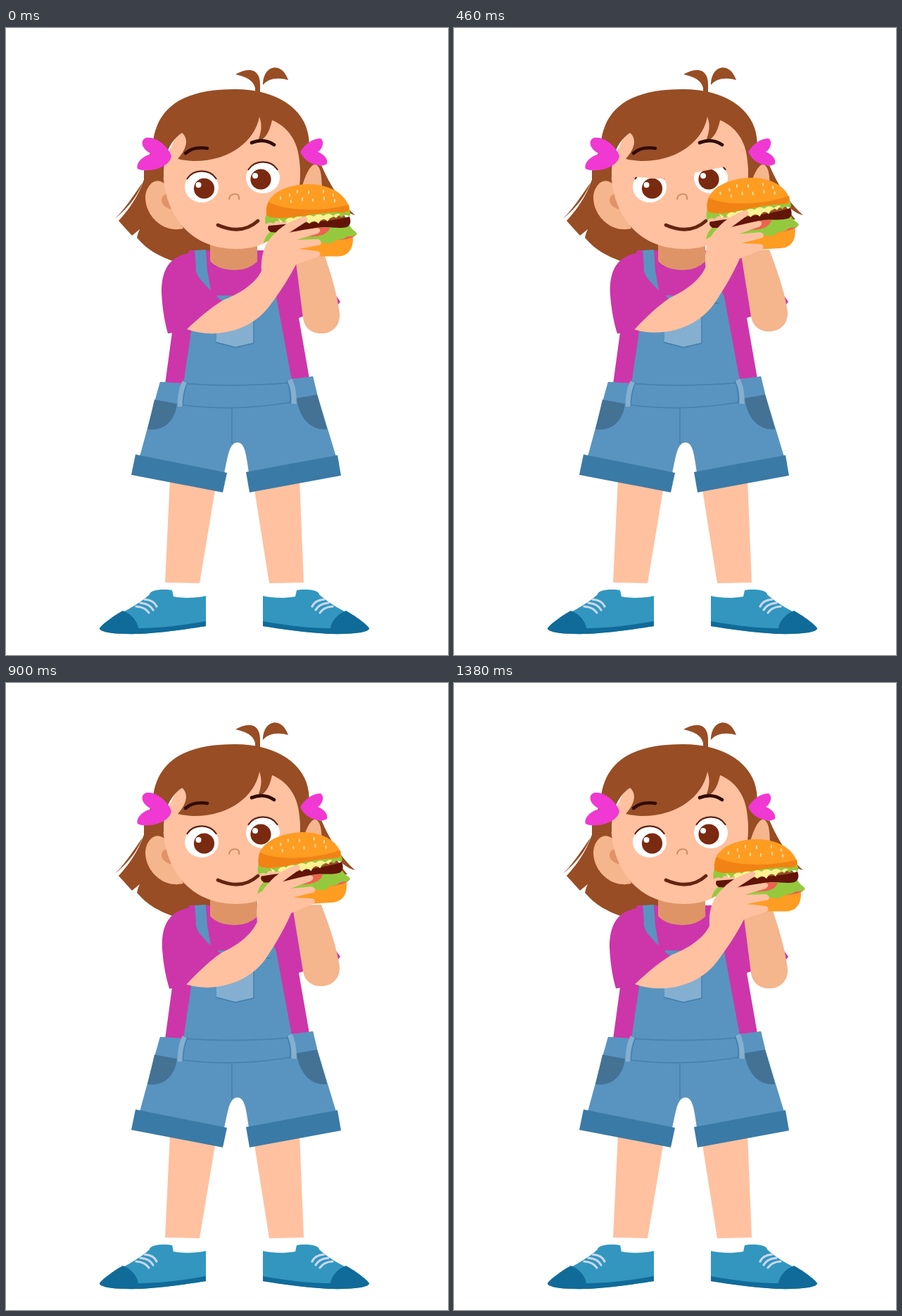
Animation, 628 px wide and 891 px high, one loop 1.4 s. Source, as an HTML page:

```html
<!DOCTYPE html>
<html lang="en">
<head>
<meta charset="utf-8">
<title>Girl with a burger</title>
<style>
html, body { margin: 0; width: 100%; height: 100%; overflow: hidden; background: #fff; }
svg { display: block; width: 100vw; height: 100vh; }
.hair { fill: #984d24; }
.skin { fill: #ffc1a0; }
.dim { fill: #f5b58d; }
.shade { fill: #df9468; }
.shirt { fill: #cc36aa; }
.denim { fill: #5994c0; }
.cuff { fill: #3a7aa6; }
.pocket { fill: #437295; }
.light { fill: #85afd0; }
.bow { fill: #f038d2; }
.bun { fill: #ff9c22; }
.leaf { fill: #95c93d; }
.tomato { fill: #ee6250; }
.line { fill: none; stroke-linecap: round; }
.seam { stroke: #437fa9; stroke-width: 1.5; }
.loop { stroke: #85afd0; stroke-width: 7; stroke-linecap: butt; }
.brow { stroke: #320b0b; stroke-width: 4.6; }
</style>
</head>
<body>
<svg viewBox="0 0 628 891">
  <defs>
    <g id="shoe">
      <path fill="#3296bf" d="M284 807V850C258 854 225 859 190 861C150 862 133 858 133 853C140 840 182 826 204 805C204 797 230 797 236 799L238 808C255 811 270 810 284 807Z"/>
      <path fill="#106b99" d="M284 850V843C250 849 220 853 188 853C187 844 179 833 166 828C150 837 140 845 133 853C133 858 150 862 190 861C225 859 258 854 284 850Z"/>
      <path class="line" stroke="#c9d8ee" stroke-width="3.2" d="M197 812Q210 813 214 822M191 817Q204 818 209 827M185 822Q198 823 203 831"/>
    </g>
    <g id="eye">
      <ellipse rx="24" ry="22" fill="#fff"/>
      <path class="line" stroke="#5a2413" stroke-width="2.2" d="M-20.500-12A24 22 0 0 1 20.500-12"/>
    </g>
    <g id="iris">
      <circle r="14.6" fill="#7a2a10"/>
      <circle r="4" cx="-8" cy="-5" fill="#fff"/>
    </g>
  </defs>

  <!-- back hair -->
  <path class="hair" d="M203 185C198 225 180 252 160 274L179 295L190 286Q187 292 186 298C200 315 220 326 240 332L295 318V190Z"/>
  <path class="hair" d="M194 220C187 239 172 257 155 271C168 258 180 240 191 224Z"/>
  <path class="hair" d="M196 200L212 160H230V225H196Z"/>
  <path class="hair" d="M420 145L443 185C453 218 466 250 485 272L415 280Z"/>
  <path class="hair" d="M446 190C457 217 474 247 496 266C478 262 460 240 449 216Z"/>
  <path class="hair" d="M326 66C342 56 361 56 361 80V92H354V85C351 74 341 69 326 66Z"/>
  <path class="hair" d="M365 81C365 52 392 47 401 74C387 70 373 71 365 81Z"/>

  <!-- legs and shoes -->
  <path class="skin" d="M233 640L299 645L275 789L226 788ZM352 650L417 640L423 788L374 789Z"/>
  <use href="#shoe"/>
  <use href="#shoe" transform="matrix(-1 0 0 1 649 0)"/>

  <!-- torso -->
  <path class="shirt" d="M237 425L226 506L431 498L416 412L472 393L475 389L432 328L400 325L370 316H260Z"/>
  <path class="shade" d="M290 300H357V332Q343 345 323 344Q300 343 290 331Z"/>
  <path class="denim" d="M300 380L362 381L380 372L384 382L407 506H252L264 425Z"/>
  <path class="line seam" d="M362 391H376"/>
  <path class="light" d="M299 420L352 408V447L326 453L299 446Z"/>
  <path class="line seam" d="M299 447L326 454L352 448V408"/>

  <!-- shorts -->
  <path class="denim" d="M219 503Q325 512 436 495L442 520L469 609L346 638C341 605 340 590 329 589C317 590 316 605 309 638L190 609L212 528Z"/>
  <path class="pocket" d="M211 528L243 534C240 560 222 574 201 570ZM413 526L442 521L456 570C435 573 416 555 413 526Z"/>
  <path class="denim" d="M219 503L212 528L248 534L250 505ZM436 495L442 520L412 526L407 502Z"/>
  <path class="line seam" d="M252 505Q325 511 404 504M252 536Q325 545 404 532M321 540V590"/>
  <path class="line seam" d="M258 504Q252 515 251 538M399 502Q405 515 404 533"/>
  <path class="line loop" d="M254 503Q247 515 247 538M403 500Q410 513 409 534"/>
  <path class="cuff" d="M184 606L314 632L308 660L178 635ZM341 631L471 607L476 636L346 660Z"/>

  <!-- head -->
  <path class="dim" d="M226 222C212 209 198 225 198 241C198 266 222 292 252 285Z"/>
  <path class="shade" d="M231 235C217 236 215 257 243 259Z"/>
  <path class="dim" d="M421 224C427 205 434 192 441 194C449 200 448 215 449 225Z"/>
  <path class="skin" d="M223 195C222 260 257 314 327 314C387 314 418 270 418 200C418 150 400 118 360 112L250 135Z"/>
  <use href="#eye" x="278" y="226"/>
  <use href="#iris" x="281.5" y="228"/>
  <use href="#eye" x="365" y="213"/>
  <use href="#iris" x="362" y="215"/>
  <rect id="lidL" class="skin" x="-27" y="-55" width="54" height="55"/>
  <rect id="lidR" class="skin" x="-27" y="-55" width="54" height="55"/>
  <path class="hair" d="M208 172C211 108 258 87 325 87C385 87 425 115 430 155C433 180 430 198 421 223H418C419 210 418 200 417 190C415 160 400 140 378 131C374 150 368 157 357 163C362 150 365 140 360 126C354 160 318 190 265 189Q252 188 244 186C257 172 260 157 250 149C233 160 223 182 224 212L213 216Z"/>
  <path class="line brow" d="M255 178Q266 168 286 171M349 163Q366 156 381 166"/>
  <path class="line" stroke="#d58f67" stroke-width="2.2" d="M317 243Q318 236 325 236T331 243"/>
  <path class="line" stroke="#64240f" stroke-width="4.8" d="M301 280Q335 295 358 274"/>
  <path class="bow" d="M235 182C231 169 214 154 199 156C190 159 192 172 207 179C195 181 184 192 187 200C197 206 232 201 235 182Z"/>
  <path class="bow" d="M418 176C424 166 436 156 447 157C453 161 450 172 443 176C451 179 458 186 456 193C449 199 425 194 418 176Z"/>

  <path id="farArm" class="dim" d="M410 318L422 412C424 428 437 435 450 434C465 433 475 422 474 406C471 380 462 350 451 318Z"/>
  <path id="sleeve" class="shirt" d="M268 319C235 321 221 340 221 375C222 400 226 420 230 434L238 433L265 428L310 390C295 380 286 365 282 345Z"/>
  <path class="denim" d="M268 316L284 315L286 345L291 373C278 360 268 350 270 340Z"/>

  <!-- burger and near arm -->
  <g id="nearArm">
    <path class="bun" d="M380 298L493 296C494 314 486 325 470 324.500H405Z"/>
    <path class="tomato" d="M400 290L470 282L497 295Q488 301 470 301Z"/>
    <path class="leaf" d="M366 306C369 291 379 286 390 285L488 280C493 289 497 288 499 293C491 299 487 293 481 299C475 302 470 299 465 304C458 309 452 303 446 306L390 306Q374 299 366 306Z"/>
    <path class="tomato" d="M400 291Q432 281 460 284Q457 294 440 296L405 298Z"/>
    <path fill="#621408" d="M373 281C400 278 460 276 488 268C491 275 489 281 484 283C470 286 460 281 440 284C420 288 400 292 376 290Q370 286 373 281Z"/>
    <path class="leaf" d="M370 264L486 256Q491 262 488 268Q482 263 477 269Q470 264 463 270L390 276Q385 271 380 278Q375 274 369 279Q367 272 370 264Z"/>
    <path fill="#fff293" d="M385 268L480 261Q473 265 469 270Q463 264 457 275Q450 267 444 278Q438 271 431 278Q423 270 416 280Q408 271 402 279Q396 270 390 277Z"/>
    <path class="leaf" d="M380 266L484 257L477 266Q471 261 465 267Q458 261 451 267Q444 262 437 268Q430 263 423 270Q416 264 409 271Q402 266 395 276Z"/>
    <path class="bun" d="M370 265C366 235 400 222 430 222C465 222 486 240 488 258C488 263 480 262 470 262C440 262 410 271 385 270Q371 269 370 265Z"/>
    <path fill="#f08314" d="M370 265Q370 254 373 247C395 260 450 262 487 251C489 260 486 263 470 262C440 262 410 271 385 270Q371 269 370 265Z"/>
    <path class="line" stroke="#ffdc98" stroke-width="2" d="M390 240v3M403 236v3M405 245v3M414 231v3M421 242v3M430 232v3M436 243v3M451 231v3M452 241v3M465 236v3M467 244v3"/>
    <path class="skin" d="M257 428C278 408 296 394 310 386C338 375 356 360 363 345C362 325 366 306 382 292C395 278 410 272 424 268C430 269 429 274 424 277L402 291Q424 286 443 284C449 286 446 292 440 293L413 301L443 300C450 302 449 309 443 309L416 314L443 317C449 319 447 325 441 326L412 336C404 352 390 375 372 398C345 432 295 442 257 428Z"/>
  </g>
</svg>
<script>
const LOOP = 1400, SHUT = 220, OPEN = 540;
const place = (id, value) => document.getElementById(id).setAttribute('transform', value);

function draw(now) {
  const t = now % LOOP;
  const lift = (1 - Math.cos(2 * Math.PI * t / LOOP)) / 2;
  const lid = t < SHUT ? t / SHUT : Math.max(0, (OPEN - t) / (OPEN - SHUT));

  place('nearArm', `rotate(${-4.4 * lift} 265 440)`);
  place('sleeve', `rotate(${-1.6 * lift} 248 340)`);
  place('farArm', `translate(0 ${-4 * lift}) rotate(${-2.5 * lift} 448 410)`);
  place('lidL', `translate(278 ${201 + 49 * lid}) rotate(4)`);
  place('lidR', `translate(365 ${188 + 53 * lid}) rotate(-11)`);
  requestAnimationFrame(draw);
}
requestAnimationFrame(draw);
</script>
</body>
</html>
```
